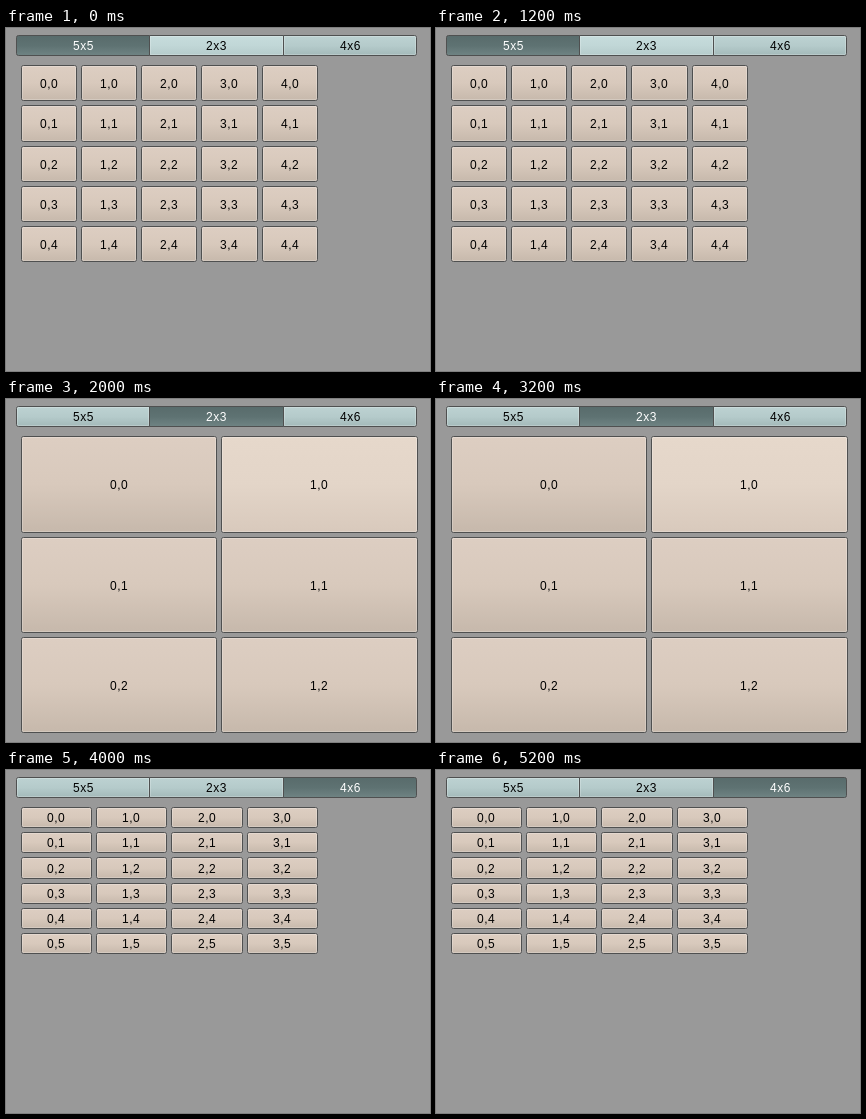
An HTML page with a canvas for the animation above (6000 ms loop, 424 by 343 pixels).

```html
<!DOCTYPE html>
<html lang="en">
<head>
<meta charset="utf-8">
<title>Tabbed grids</title>
<style>
  html, body { margin: 0; overflow: hidden; background: #999; }
  canvas { display: block; }
</style>
</head>
<body>
<canvas id="stage" width="424" height="343"></canvas>
<script>
const ctx = document.getElementById("stage").getContext("2d");
const HOLD = 2000;
const GAP = 4;
const pages = [
  { cols: 5, rows: 5, w: 301, h: 201, hoverTab: 1 },
  { cols: 2, rows: 3, w: 401, h: 301, hover: "1,0" },
  { cols: 4, rows: 6, w: 301, h: 150.8 },
];
const styles = {
  button: { fill: ["#ddcec2", "#d8c9bc", "#c6b8ab"], text: "#000" },
  hover: { fill: ["#e6d8cb", "#e3d5c8", "#d8c9bc"], text: "#000" },
  tab: { fill: ["#bdd2d2", "#b5cbcb", "#a2b8b8"], text: "#000" },
  hoverTab: { fill: ["#c7dcdc", "#c1d7d7", "#b4caca"], text: "#000" },
  active: { fill: ["#586b6b", "#5e7272", "#708484"], text: "#fff" },
};

function drawBox(x, y, w, h, label, style, radii) {
  const fill = ctx.createLinearGradient(0, y, 0, y + h);
  style.fill.forEach((color, i) => fill.addColorStop(i / 2, color));
  ctx.beginPath();
  ctx.roundRect(x + 0.5, y + 0.5, w - 1, h - 1, radii);
  ctx.fillStyle = fill;
  ctx.fill();
  ctx.strokeStyle = "#4f5050";
  ctx.stroke();
  if (style !== styles.active) {
    ctx.strokeStyle = "rgba(255, 255, 255, 0.22)";
    ctx.strokeRect(x + 1.5, y + 1.5, w - 3, h - 3);
  }
  ctx.fillStyle = style.text;
  const left = Math.round(x + (w - ctx.measureText(label).width) / 2);
  ctx.fillText(label, left, Math.floor(y + h / 2) + 5);
}

function drawTabs(current) {
  const edges = [10, 143, 277, 411];
  const corners = [[2, 0, 0, 2], 0, [0, 2, 2, 0]];
  pages.forEach(({ cols, rows }, i) => {
    const style = i === current ? styles.active
      : i === pages[current].hoverTab ? styles.hoverTab : styles.tab;
    const right = edges[i + 1] + (i < 2 ? 1 : 0);
    drawBox(edges[i], 7, right - edges[i], 21, `${cols}x${rows}`, style, corners[i]);
  });
}

function drawGrid({ cols, rows, w, h, hover }) {
  const xAt = i => Math.floor(15.3 + i * w / cols);
  const yAt = j => Math.floor(37.68 + j * h / rows);
  for (let j = 0; j < rows; j++) {
    for (let i = 0; i < cols; i++) {
      const x = xAt(i), y = yAt(j), label = `${i},${j}`;
      const style = label === hover ? styles.hover : styles.button;
      drawBox(x, y, xAt(i + 1) - GAP - x, yAt(j + 1) - GAP - y, label, style, 2);
    }
  }
}

function draw() {
  const current = Math.floor(performance.now() / HOLD) % pages.length;
  ctx.fillStyle = "#999";
  ctx.fillRect(0, 0, 424, 343);
  ctx.font = "12px 'Liberation Sans', Arial, sans-serif";
  ctx.letterSpacing = "0.5px";
  drawTabs(current);
  drawGrid(pages[current]);
  requestAnimationFrame(draw);
}
draw();
</script>
</body>
</html>
```
